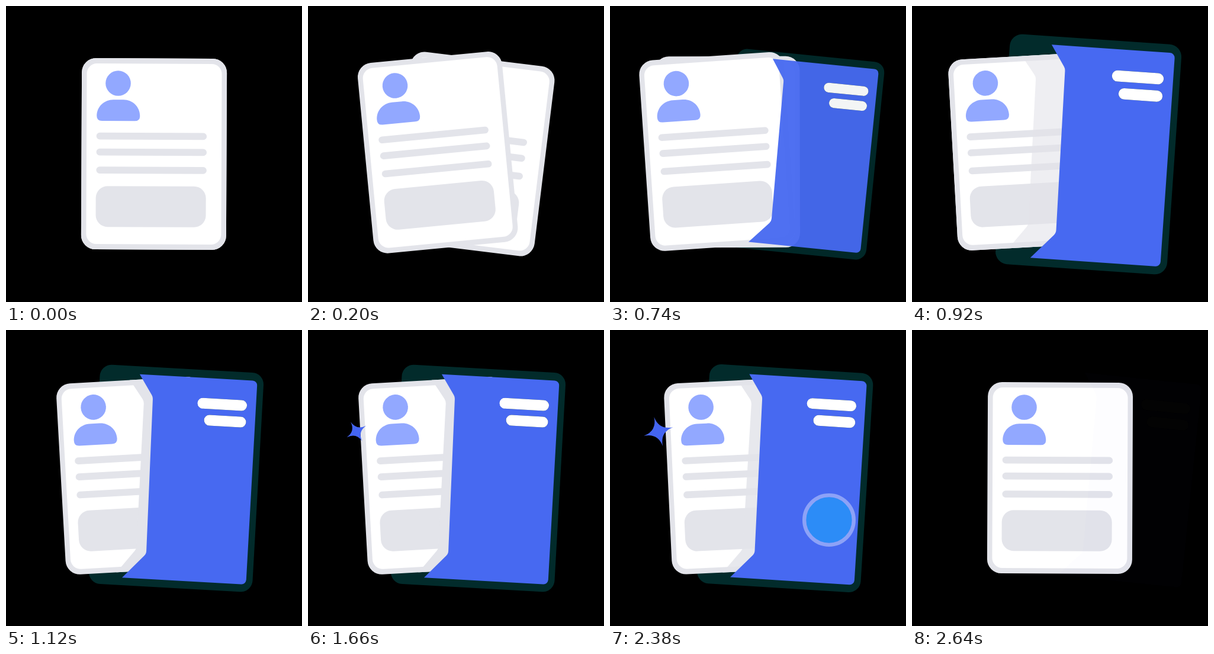
An HTML page with a canvas for the animation above (3000 ms loop, 500 px wide and 500 px high).

```html
<!DOCTYPE html>
<html lang="en">
<head>
<meta charset="utf-8">
<title>Documents into folder</title>
<style>
  html, body { margin: 0; width: 100%; height: 100%; overflow: hidden; background: #000; }
  canvas { display: block; width: 500px; height: 500px; }
</style>
</head>
<body>
<canvas id="stage" width="500" height="500"></canvas>
<script>
const ctx = document.getElementById('stage').getContext('2d');
const LOOP = 3000;
const GREY = '#e3e4ea', WHITE = '#fff', AVATAR = '#92a8ff';
const BLUE = '#4769f1', DARK = '#022b2b', CYAN = '#00c6ff', STAR = '#4465f2';

// Card poses: x, y, angle
const HOME = [250, 250, .25];
const FAN_LEFT = [201.5, 245.8, -8.8];
const FAN_RIGHT = [294, 250, 10.9];
const TUCKED = [215.2, 246, -3.2];

const mix = (a, b, k) => a + (b - a) * k;
const progress = (t, from, to) => Math.min(1, Math.max(0, (t - from) / (to - from)));
const smooth = (t, from, to) => {
  const u = progress(t, from, to);
  return u * u * (3 - 2 * u);
};
const bump = (t, from, to) => Math.sin(Math.PI * progress(t, from, to)) ** 2;
// Grows past 1 and settles
const pop = (t, from, to) => {
  const w = 1 - progress(t, from, to);
  return 1 - 2.7 * w ** 3 + 1.7 * w ** 2;
};
const mixPose = (a, b, move, turn = move) => a.map((v, i) => mix(v, b[i], i < 2 ? move : turn));

const leaving = t => smooth(t, 2300, 2640);

function frontPose(t) {
  const fanned = mixPose(HOME, FAN_LEFT, smooth(t, 0, 340));
  const tucked = mixPose(fanned, TUCKED, smooth(t, 500, 1120), smooth(t, 500, 810));
  tucked[0] -= 28.5 * bump(t, 500, 1120);
  return mixPose(tucked, HOME, leaving(t));
}

function backPose(t) {
  const fanned = mixPose(HOME, FAN_RIGHT, smooth(t, 0, 340));
  return mixPose(fanned, frontPose(t), smooth(t, 500, 820), smooth(t, 500, 860));
}

function folderState(t) {
  const away = 1 - smooth(t, 500, 1080), out = leaving(t);
  return {
    x: 287.5 + 57.5 * (away + out),
    angle: 3.2 + 4.1 * away + 2.7 * out,
    scale: mix(.5, 1, pop(t, 617, 1120)),
    alpha: smooth(t, 617, 760) * mix(1, .01, smooth(t, 2390, 2640))
  };
}

function at(x, y, angle, scale, draw) {
  ctx.save();
  ctx.translate(x, y);
  ctx.rotate(angle * Math.PI / 180);
  ctx.scale(scale, scale);
  draw();
  ctx.restore();
}

function box(x, y, w, h, r, color) {
  ctx.beginPath();
  ctx.roundRect(x, y, w, h, r);
  ctx.fillStyle = color;
  ctx.fill();
}

function disc(x, y, r, color) {
  ctx.beginPath();
  ctx.arc(x, y, r, 0, 2 * Math.PI);
  ctx.fillStyle = color;
  ctx.fill();
}

// Points are [x, y, corner radius]
function polygon(points) {
  const path = new Path2D(), first = points[0], last = points[points.length - 1];
  path.moveTo((last[0] + first[0]) / 2, (last[1] + first[1]) / 2);
  points.forEach(([x, y, r = 0], i) => {
    const next = points[(i + 1) % points.length];
    path.arcTo(x, y, next[0], next[1], r);
  });
  path.closePath();
  return path;
}

const foldShade = polygon([[2, -163], [8.4, -152.8], [24.8, -124.8, 14], [-2.1, 124, 12],
  [-30.9, 154.5], [-40, 164], [130, 164], [130, -163]]);
const labels = new Path2D();
labels.roundRect(29, -138, 83.5, 18, 9);
labels.roundRect(41.5, -110, 71, 18, 9);
const flap = polygon([[-71.3, -172], [-47, -135, 12], [-43.4, 130, 12], [-82, 172.5],
  [127.7, 172.5, 8], [127.7, -172, 8]]);
flap.addPath(labels);

function drawAvatar() {
  disc(-61, -119.2, 21.3, AVATAR);
  ctx.beginPath();
  ctx.moveTo(-97, -64);
  ctx.bezierCurveTo(-97, -80, -84, -91.5, -69, -91.5);
  ctx.lineTo(-52, -91.5);
  ctx.bezierCurveTo(-37, -91.5, -24, -80, -24, -64);
  ctx.quadraticCurveTo(-24, -55.5, -33, -55.5);
  ctx.lineTo(-88, -55.5);
  ctx.quadraticCurveTo(-97, -55.5, -97, -64);
  ctx.fill();
}

function drawCard([x, y, angle], shade = 0) {
  at(x, y, angle, 1, () => {
    box(-122.5, -161.5, 245, 323, 24, GREY);
    box(-114, -152.5, 228, 305, 17, WHITE);
    drawAvatar();
    for (const line of [-30, -3, 27.5]) box(-97.5, line - 5.8, 186.5, 11.6, 5.8, GREY);
    box(-98, 54.5, 186, 69, 20, GREY);

    ctx.beginPath();
    ctx.roundRect(-122.5, -161.5, 245, 323, 24);
    ctx.clip();
    ctx.globalAlpha = shade;
    ctx.fillStyle = GREY;
    ctx.fill(foldShade);
  });
}

function drawFolder({ x, angle, scale, alpha }, part) {
  at(x, 250.5, angle, scale, () => {
    ctx.globalAlpha = alpha;
    part();
  });
}

function folderBack() {
  box(-138.5, -185.5, 277, 371, 20, DARK);
}

// The labels are cut out of the flap so that both fade as one sheet
function folderFlap() {
  ctx.fillStyle = BLUE;
  ctx.fill(flap, 'evenodd');
  ctx.fillStyle = WHITE;
  ctx.fill(labels);
}

function drawStar(t) {
  if (t < 1620) return;
  const size = mix(.2, 1, pop(t, 1620, 2140)) * (1 - smooth(t, 2200, 2640));
  at(81.8, 171.5, 15 + 86 * (size - 1), size, () => {
    const tip = 40.5, waist = 3;
    ctx.fillStyle = STAR;
    ctx.beginPath();
    ctx.moveTo(0, -tip);
    ctx.quadraticCurveTo(waist, -waist, tip, 0);
    ctx.quadraticCurveTo(waist, waist, 0, tip);
    ctx.quadraticCurveTo(-waist, waist, -tip, 0);
    ctx.quadraticCurveTo(-waist, -waist, 0, -tip);
    ctx.fill();
  });
}

function drawBadge(t) {
  const size = mix(.3, 1, pop(t, 1790, 2140)) * (1 - smooth(t, 2160, 2620));
  const alpha = smooth(t, 1790, 1860) * (1 - smooth(t, 2160, 2540));
  const check = .55 * smooth(t, 1800, 1900) * (1 - smooth(t, 2160, 2360));
  at(370, 321, 0, size, () => {
    ctx.globalAlpha = alpha;
    disc(0, 0, 73.2, CYAN);
    ctx.beginPath();
    ctx.arc(0, 0, 79, 0, 2 * Math.PI);
    ctx.lineWidth = 12;
    ctx.strokeStyle = WHITE;
    ctx.stroke();

    ctx.globalAlpha = alpha * check;
    ctx.beginPath();
    ctx.moveTo(-43, -1.5);
    ctx.lineTo(-10.5, 30.5);
    ctx.lineTo(40.5, -24.5);
    ctx.lineWidth = 19;
    ctx.lineCap = ctx.lineJoin = 'round';
    ctx.stroke();
  });
}

function render(t) {
  const folder = folderState(t);
  ctx.fillStyle = '#000';
  ctx.fillRect(0, 0, 500, 500);
  drawFolder(folder, folderBack);
  if (t < 1000) drawCard(backPose(t));
  drawCard(frontPose(t), smooth(t, 760, 1040) * (1 - leaving(t)));
  drawFolder(folder, folderFlap);
  drawStar(t);
  drawBadge(t);
}

const start = performance.now();
function tick() {
  render((performance.now() - start) % LOOP);
  requestAnimationFrame(tick);
}
tick();
</script>
</body>
</html>
```
